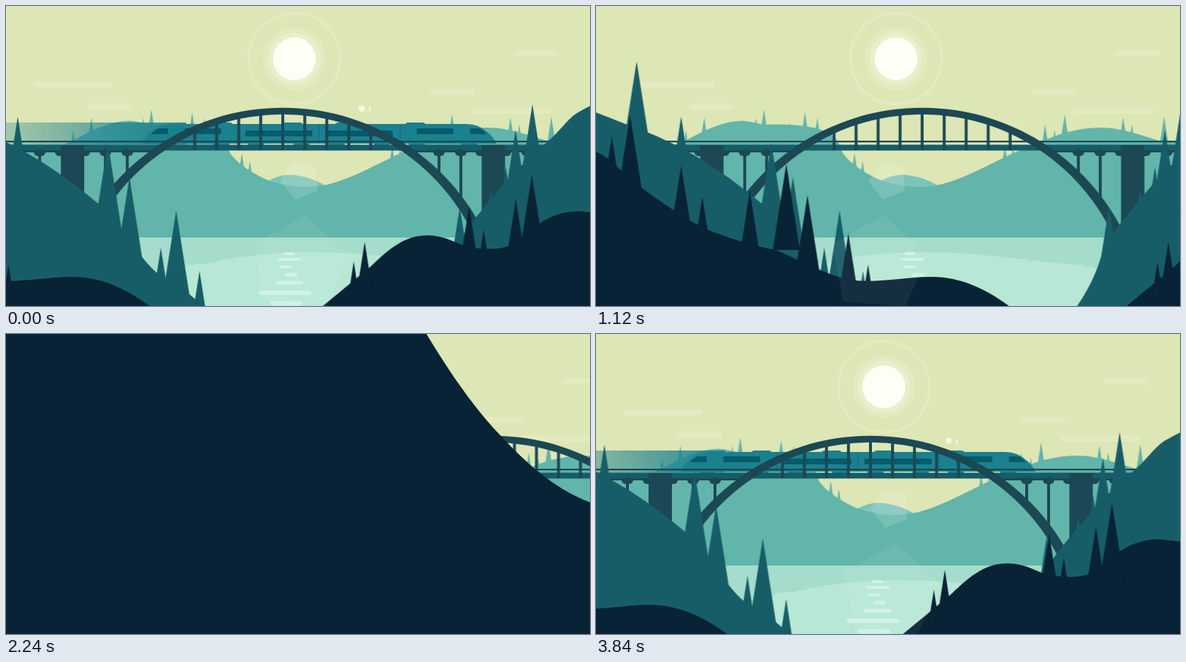
An HTML page without scripts that plays this animation: 800 by 412 pixels, repeating every 3.88 s.

```html
<!DOCTYPE html>
<html lang="en">
<head>
<meta charset="utf-8">
<title>Bridge over the lake</title>
<style>
html, body { margin: 0; width: 100%; height: 100%; overflow: hidden; background: #dde6b5; }
svg { display: block; width: 100vw; height: 100vh; }

/* every layer shares one pan; --k is its depth */
.pan { animation: pan 3.88s linear -1.42s infinite; }
@keyframes pan {
  0% { transform: translateX(calc(var(--k) * -311px)); animation-timing-function: cubic-bezier(.333, .6545, .667, .884); }
  36.598% { transform: translateX(0); animation-timing-function: cubic-bezier(.333, .4554, .667, .6404); }
  57.216% { transform: translateX(calc(var(--k) * 44.5px)); animation-timing-function: cubic-bezier(.333, .218, .667, .4985); }
  73.711% { transform: translateX(calc(var(--k) * 103.2px)); animation-timing-function: cubic-bezier(.333, .2002, .667, .514); }
  94.33% { transform: translateX(calc(var(--k) * 287px)); }
  100% { transform: translateX(calc(var(--k) * 366px)); }
}

.train { animation: ride 3.88s linear -1.94s infinite; }
@keyframes ride {
  from { transform: translateX(-3395px); }
  to { transform: translateX(3395px); }
}

.puff { transform-box: fill-box; transform-origin: center; animation: puff 3.88s linear -.1s infinite; }
@keyframes puff {
  0% { transform: translate(-10px, 14px) scale(.8); opacity: 1; }
  2.58% { transform: none; animation-timing-function: cubic-bezier(.15, .55, .5, 1); }
  27% { transform: translate(36px, -46px) scale(.25); opacity: 1; }
  29%, 100% { transform: translate(36px, -46px) scale(0); opacity: 0; }
}

.flare { fill: #fff; animation: flare 3.88s linear infinite; }
@keyframes flare {
  0%, 49% { opacity: 1; }
  56.5%, 69.6% { opacity: 0; }
  74%, 100% { opacity: 1; }
}

.sky { --k: .235; }
.far { --k: .46; fill: #62b5aa; }
.bridge { --k: 1; fill: #1b4854; }
.midl { --k: 1.487; fill: #175d68; }
.midr { --k: 1.2; fill: #175d68; }
.nearr { --k: 4.33; fill: #082335; }
.nearl { --k: 5.46; fill: #082335; }
</style>
</head>
<body>
<svg viewBox="0 0 800 412">
  <defs>
    <path id="t" d="M0 0l18.5 118h-37z"/>
    <path id="cap" d="M-8 198h16v3q-1 5-6 5h-4q-5 0-6-5z"/>
    <linearGradient id="blur">
      <stop offset="0" stop-color="#1b818f" stop-opacity="0"/>
      <stop offset="1" stop-color="#1b818f" stop-opacity=".92"/>
    </linearGradient>
    <g id="half">
      <path fill="#1b818f" d="M427 162h22l3-2h22l3 2h68l3-2h22l3 2h56q16 0 27 10 11 8 14 17H427z"/>
      <path fill="#177482" d="M426 163h2v25h-2zM537 163h2v25h-2z"/>
      <path fill="#055b6b" d="M436 171h92v8h-92zM561 168h50v8h-50zM634 168h13q6 3 10 8h-23z"/>
      <path fill="#1b818f" d="M440 188h22v3h-22zM502 188h22v3h-22zM550 188h22v3h-22zM622 188h22v3h-22z"/>
    </g>
  </defs>

  <rect width="800" height="412" fill="#dde6b5"/>

  <g class="pan sky">
    <g fill="#e3eac0">
      <rect x="37" y="103.500" width="110" height="9" rx="4.500"/>
      <rect x="111" y="134.500" width="63" height="9" rx="4.500"/>
      <rect x="581" y="113.500" width="62" height="9" rx="4.500"/>
      <rect x="695" y="61" width="62" height="9" rx="4.500"/>
      <rect x="637" y="139" width="110" height="9" rx="4.500"/>
    </g>
    <circle cx="395" cy="72.500" r="62.500" fill="none" stroke="#e3eac0" stroke-width="4"/>
    <circle cx="395" cy="72.500" r="43" fill="#e3eac0"/>
    <circle cx="395" cy="72.500" r="36" fill="#e9efcb"/>
    <circle cx="395" cy="72.500" r="29.500" fill="#fcfff4"/>
  </g>

  <g class="pan far">
    <path fill="#7cc4b8" d="M345 250C362 236 376 232 388 232 406 232 425 238 450 254z"/>
    <path d="M-700 190H80C100 182 130 160 165 158 178 157 190 162 200 163 235 161 265 165 280 171Q300 178 305 198C312 214 340 232 361 240 395 252 425 249 445 244 480 234 510 216 545 200L575 188C600 176 630 167 660 167 692 167 720 180 745 186H1500V320H-700z"/>
    <use href="#t" x="92" y="171"/>
    <use href="#t" x="117" y="153"/>
    <use href="#t" x="131" y="165"/>
    <use href="#t" x="188" y="154"/>
    <use href="#t" x="199" y="142"/>
    <use href="#t" x="234" y="160"/>
    <use href="#t" x="255" y="146"/>
    <use href="#t" x="272" y="154"/>
    <use href="#t" x="294" y="178"/>
    <use href="#t" x="323" y="202"/>
    <use href="#t" x="334" y="213"/>
    <use href="#t" x="529" y="192"/>
    <use href="#t" x="540" y="194"/>
    <use href="#t" x="584" y="163"/>
    <use href="#t" x="597" y="170"/>
    <use href="#t" x="611" y="149"/>
    <use href="#t" x="691" y="153"/>
    <use href="#t" x="703" y="163"/>
    <use href="#t" x="747" y="152"/>
  </g>

  <rect y="318" width="800" height="94" fill="#a5dccb"/>
  <path class="pan far" style="fill:#b6e8d5" d="M180 420L246 358q5-5 10-2 8-5 16-1 6-5 14-2 8-6 14-4 4-4 8-1 6-4 13-3C370 337 430 337 480 340 515 343 540 347 560 348q4 6 8 2 4-3 10 1C605 353 620 354 636 356q5 5 9 1 5 2 8 4 6-4 11 1 8-4 14-1L760 368V420z"/>
  <g fill="#d0f2e4">
    <rect class="pan" style="--k:.63" x="380" y="338" width="15" height="4" rx="2"/>
    <rect class="pan" style="--k:.67" x="372" y="346" width="32" height="4" rx="2"/>
    <rect class="pan" style="--k:.69" x="374" y="356" width="17" height="4" rx="2"/>
    <rect class="pan" style="--k:.75" x="382" y="366.500" width="17" height="5" rx="2.500"/>
    <rect class="pan" style="--k:.79" x="369" y="377.500" width="38" height="5" rx="2.500"/>
    <rect class="pan" style="--k:.84" x="346" y="391" width="72" height="6" rx="3"/>
    <rect class="pan" style="--k:.92" x="362" y="405.500" width="44" height="6" rx="3"/>
  </g>

  <g class="train">
    <rect x="-115" y="160" width="360" height="30" fill="url(#blur)"/>
    <use href="#half"/>
    <use href="#half" transform="matrix(-1 0 0 1 854 0)"/>
  </g>
  <g fill="#f4f8de">
    <circle class="puff" cx="487" cy="141" r="4.500"/>
    <path class="puff" d="M499 138q2 6-3 10 2-5 1-9z"/>
  </g>

  <g class="pan bridge">
    <path d="M75 191h32v135h-32zM651.500 191h32v135h-32z"/>
    <path d="M-700 198H215v3H-700zM545 198H1500v3H545z"/>
    <path d="M-700 185H1500v2.200H-700z"/>
    <path fill="#165d69" d="M-700 190.500H1500v8H-700z"/>
    <path d="M75 191h32v12h-32zM651.500 191h32v12h-32z"/>
    <use href="#cap" x="46"/>
    <use href="#cap" x="75"/>
    <use href="#cap" x="107"/>
    <use href="#cap" x="136"/>
    <use href="#cap" x="166"/>
    <use href="#cap" x="593"/>
    <use href="#cap" x="623"/>
    <use href="#cap" x="651"/>
    <use href="#cap" x="684"/>
    <use href="#cap" x="714"/>
    <path fill="none" stroke="#1b4854" stroke-width="4" d="M46 196v45M136 196v74M166 196v39M593 196v39M623 196v74M714 196v45"/>
    <path fill="none" stroke="#1b4854" stroke-width="4" d="M258.400 174v24M288.500 160v38M318.700 152v46M348.800 147v51M379 145v53M409.200 147v51M439.300 152v46M469.500 160v38M499.600 174v24"/>
    <path d="M89 344A308 308 0 0 1 669 344L654 349A289 289 0 0 0 104 349z"/>
  </g>

  <g class="pan midr">
    <path d="M572 420C592 394 605 365 612 340 625 312 640 295 652 280 680 245 715 208 740 188 757 174 768 156 782 147 810 130 840 119 860 114 1000 86 1100 80 1300 60V420z"/>
    <use href="#t" x="721" y="135"/>
    <use href="#t" x="698" y="170"/>
    <use href="#t" x="684.500" y="221"/>
    <use href="#t" x="664" y="251"/>
    <use href="#t" x="621.500" y="276"/>
  </g>

  <g class="pan midl">
    <path d="M-500 40C-350 70-230 95-153 125-120 139-90 150-58 163-20 176 30 198 84 238 110 258 140 280 153 300 175 330 190 352 206 366L250 395 280 420H-500z"/>
    <use href="#t" x="-45" y="76"/>
    <use href="#t" x="16" y="152"/>
    <use href="#t" x="139.500" y="188"/>
    <use href="#t" x="169" y="235"/>
    <use href="#t" x="212" y="332"/>
    <use href="#t" x="233" y="281"/>
    <use href="#t" x="265" y="364"/>
  </g>

  <g class="pan nearr">
    <path d="M424 420L470 382 500 357C528 330 548 315 577 315 605 315 620 330 640 332 662 335 684 334 700 325 720 305 745 282 783 282 800 282 860 292 888 296 898 298 905 299 913 299 962 299 1014 246 1063 183 1100 130 1135 65 1168 0L1173-10H2300V420z"/>
    <use href="#t" x="476" y="351"/>
    <use href="#t" x="491" y="324"/>
    <use href="#t" x="634" y="275"/>
    <use href="#t" x="654" y="307"/>
    <use href="#t" x="698" y="265"/>
    <use href="#t" x="720" y="232"/>
  </g>

  <g class="pan nearl">
    <path d="M-2200-10H-999L-993 0C-960 55-925 105-891 140-850 185-810 216-767 232-690 258-630 210-564 191-530 180-500 175-469 175-425 175-390 188-364 203-350 211-340 221-329 232-310 249-285 266-264 280-245 293-225 305-204 312-175 323-150 330-124 335-105 342-85 354-64 362-45 370-30 375-14 377 20 380 55 372 91 372 130 372 165 389 196 412L206 420H-2200z"/>
    <use href="#t" x="-488" y="150"/>
    <use href="#t" x="-427" y="121"/>
    <use href="#t" x="-396" y="93"/>
    <use href="#t" x="-348" y="179"/>
    <use href="#t" x="-323" y="150"/>
    <use href="#t" x="-253" y="219"/>
    <use href="#t" x="-224" y="262"/>
    <use href="#t" x="-159" y="254"/>
    <use href="#t" x="-109" y="217"/>
    <use href="#t" x="-80" y="260"/>
    <use href="#t" x="-24" y="312"/>
    <use href="#t" x="3" y="355"/>
  </g>

  <g class="flare">
    <path class="pan" style="--k:-.05" fill-opacity=".14" d="M393 214l31 7 2.500 33-30 12-20.500-25z"/>
    <path class="pan" style="--k:-.235" fill-opacity=".06" d="M410 287l60 55-30 71-86-7-14-80z"/>
  </g>
</svg>
</body>
</html>
```
